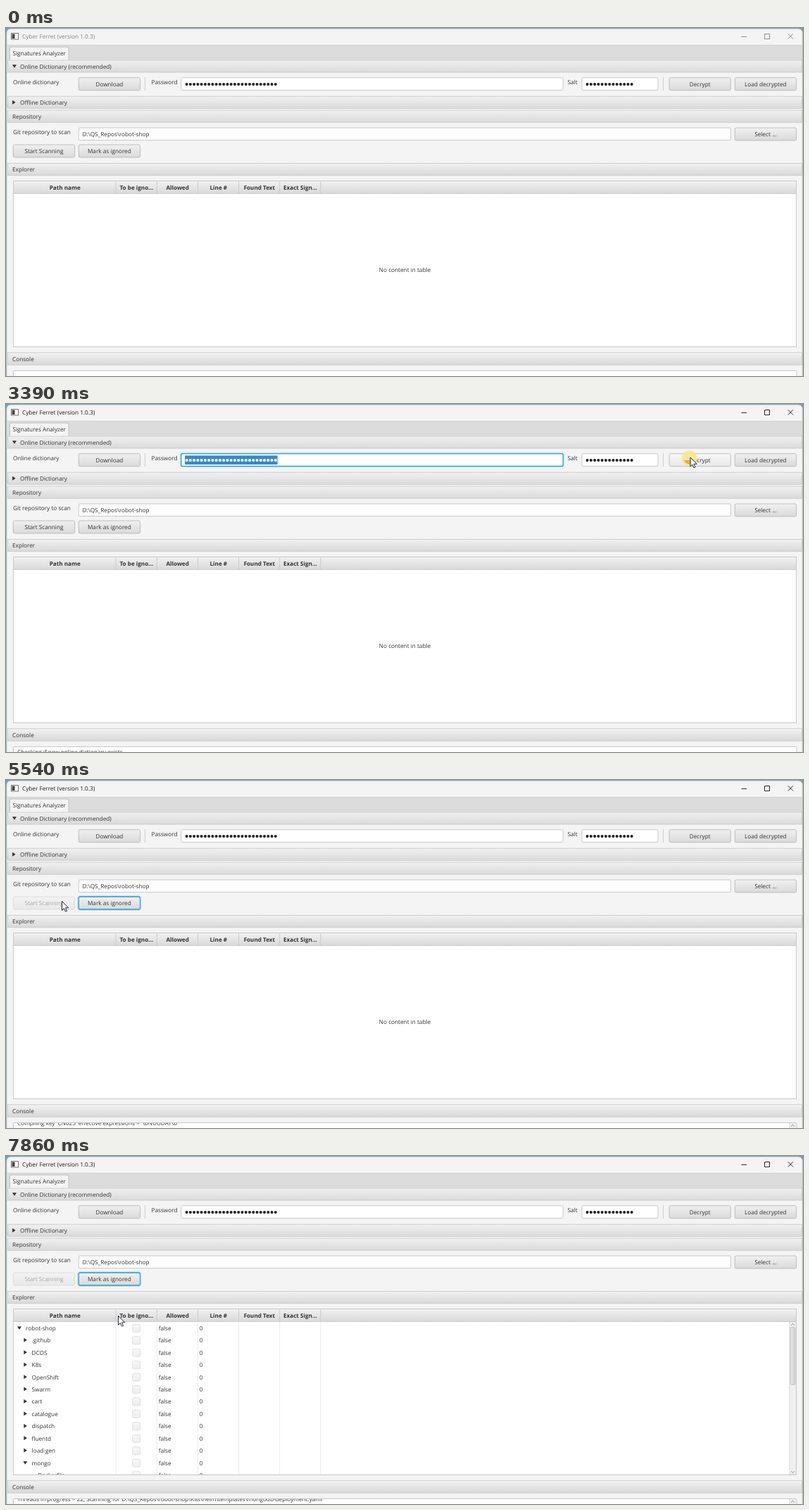
Write an HTML page that moves like this. It is 1132 by 495 pixels and loops after 8 s.

```html
<!DOCTYPE html>
<html lang="en">
<head>
<meta charset="utf-8">
<title>Signatures Analyzer</title>
<style>
  html, body { margin: 0; width: 100%; height: 100%; overflow: hidden; background: #7c9db2; }
  svg { display: block; }
  text { font: 8.23px "Open Sans", "Noto Sans", sans-serif; fill: #333; white-space: pre; text-rendering: geometricPrecision; }
  .bold { font-weight: 700; font-size: 8.15px; }
  .mid { text-anchor: middle; }
  .ring { fill: none; stroke: #35a3d6; stroke-width: 1.3; }
  .glow { fill: none; stroke: #039ed3; stroke-opacity: .16; stroke-width: 2.6; }
</style>
</head>
<body>
<svg id="stage" width="1132" height="495" viewBox="0 0 1132 495">
  <defs>
    <linearGradient id="head" x2="0" y2="1"><stop stop-color="#f1f1f1"/><stop offset="1" stop-color="#d9d9d9"/></linearGradient>
    <linearGradient id="face" x2="0" y2="1"><stop stop-color="#f0f0f0"/><stop offset="1" stop-color="#dadada"/></linearGradient>
    <linearGradient id="lit" x2="0" y2="1"><stop stop-color="#f8f8f8"/><stop offset="1" stop-color="#e8e8e8"/></linearGradient>
    <linearGradient id="thumb" x2="1" y2="0"><stop stop-color="#e9e9e9"/><stop offset="1" stop-color="#d2d2d2"/></linearGradient>
    <clipPath id="tableClip"><rect x="11" y="236" width="1111" height="217"/></clipPath>
    <clipPath id="consoleClip"><rect x="11" y="488" width="1111" height="7"/></clipPath>
  </defs>
</svg>
<script>
const LOOP = 8000;
const stage = document.getElementById('stage');

function add(parent, tag, attrs, content) {
  const el = document.createElementNS('http://www.w3.org/2000/svg', tag);
  for (const key in attrs) el.setAttribute(key, attrs[key]);
  if (content !== undefined) el.textContent = content;
  parent.appendChild(el);
  return el;
}
const group = (parent = stage, attrs = {}) => add(parent, 'g', attrs);
const rect = (p, x, y, width, height, fill, more = {}) =>
  add(p, 'rect', { x, y, width, height, fill, ...more });
const path = (p, d, more = {}) => add(p, 'path', { d, ...more });
const line = (p, d, stroke, width = 1) => path(p, d, { stroke, fill: 'none', 'stroke-width': width });
const label = (p, x, y, text, cls = '') => add(p, 'text', { x, y, class: cls }, text);
const show = (el, on) => el.setAttribute('visibility', on ? 'visible' : 'hidden');

function header(y, h, text, x = 9) {
  rect(stage, 2.5, y, 1128, h, 'url(#head)', { stroke: '#c6c6c6', 'stroke-width': .8 });
  return label(stage, x, y + h / 2 + 3, text);
}
function arrow(p, x, y, open) {
  path(p, open ? `M${x - 3} ${y - 2}h6l-3 4.6z` : `M${x - 2} ${y - 3}v6l4.6-3z`, { fill: '#333' });
}
function field(x, y, w, h) {
  rect(stage, x, y, w, h, '#fff', { stroke: '#c3c3c3', rx: 2, 'stroke-width': .9 });
}
function focusRing(x, y, w, h) {
  const g = group();
  rect(g, x - .8, y - .8, w + 1.6, h + 1.6, 'none', { rx: 3, class: 'glow' });
  rect(g, x, y, w, h, 'none', { rx: 2, class: 'ring' });
  return g;
}
function button(x, y, text) {
  const w = 87.3, h = 18, g = group();
  const box = rect(g, x, y, w, h, 'url(#face)', { stroke: '#b9b9b9', rx: 2, 'stroke-width': .9 });
  label(g, x + w / 2, y + h / 2 + 3.1, text, 'mid');
  const ring = focusRing(x, y, w, h);
  return {
    update(cx, cy, focused, disabled = false) {
      const over = !disabled && cx >= x && cx <= x + w && cy >= y && cy <= y + h;
      box.setAttribute('fill', over ? 'url(#lit)' : 'url(#face)');
      g.setAttribute('opacity', disabled ? .4 : 1);
      show(ring, focused);
    }
  };
}
function dots(p, x, y, count, fill) {
  for (let i = 0; i < count; i++) add(p, 'circle', { cx: x + i * 5.26, cy: y, r: 2.05, fill });
}

// window frame
rect(stage, .8, 1, 1130.6, 510, '#f4f4f4', { rx: 6, stroke: '#a9b4bb', 'stroke-width': .8 });
rect(stage, 7.5, 7.5, 10, 8.5, '#fff', { stroke: '#777', 'stroke-width': 1 });
rect(stage, 8.5, 8.5, 4, 6.5, '#444');
const title = label(stage, 23, 15.2, 'Cyber Ferret (version 1.0.3)');
const controls = line(stage, 'M1044.5 12.5h7.5M1077.5 8.5h7v7h-7zM1110.7 8.2l7.2 7.2m0-7.2l-7.2 7.2', '#111', .9);

// tab strip
rect(stage, 1.5, 24, 1129.5, 21.5, '#dcdcdc');
line(stage, 'M1.5 24.3H1131', '#cfcfcf', .7);
path(stage, 'M5.5 46V29q0-2 2-2H87q2 0 2 2V46', { fill: '#f4f4f4', stroke: '#bdbdbd', 'stroke-width': .9 });
label(stage, 9.5, 39.2, 'Signatures Analyzer');

// panes
const paneTitle = header(46, 17, 'Online Dictionary (recommended)', 20);
arrow(stage, 12, 54.2, true);
header(97.2, 17, 'Offline Dictionary', 20);
arrow(stage, 11, 105.7, false);
header(117, 17.2, 'Repository');
header(192.5, 17.2, 'Explorer');
header(461.8, 17.4, 'Console');

label(stage, 10, 80.2, 'Online dictionary');
label(stage, 206.5, 80.2, 'Password');
label(stage, 797.5, 80.2, 'Salt');
line(stage, 'M197.5 70V89M933.5 70V89', '#d0d0d0');
field(248.7, 70.7, 542.6, 17.8);
field(818, 70.7, 108, 17.8);
const plain = group(), picked = group();
dots(plain, 256.6, 80, 25, '#222');
rect(picked, 254, 73.3, 131.6, 12.8, '#3a89c6');
dots(picked, 256.6, 80, 25, '#fff');
dots(stage, 825.6, 80, 13, '#222');
const passRing = focusRing(248.7, 70.7, 542.6, 17.8);

label(stage, 10, 151.3, 'Git repository to scan');
field(103.3, 142, 926, 17.6);
label(stage, 108.5, 154.2, 'D:\\QS_Repos\\robot-shop');

const download = button(103.2, 70.7, 'Download');
const decrypt = button(942, 70.7, 'Decrypt');
const load = button(1035.2, 70.7, 'Load decrypted');
const select = button(1035.2, 142, 'Select ...');
const start = button(10.3, 166, 'Start Scanning');
const mark = button(103.2, 166, 'Mark as ignored');

// table
rect(stage, 10.5, 217.5, 1112, 236, '#fff', { stroke: '#c4c4c4', 'stroke-width': .9 });
rect(stage, 11, 218, 1111, 17.5, 'url(#head)');
line(stage, 'M11 235.6H1122', '#c4c4c4', .8);
const edges = [156, 214.3, 272.6, 330.6, 388.7, 446.8];
const names = ['Path name', 'To be igno...', 'Allowed', 'Line #', 'Found Text', 'Exact Sign...'];
names.forEach((name, i) => {
  label(stage, ((edges[i - 1] || 11) + edges[i]) / 2 + .2, 230.3, name, 'bold mid');
  line(stage, `M${edges[i]} 218V235.5`, '#c6c6c6', .8);
});
const empty = label(stage, 566.5, 347.4, 'No content in table', 'mid');

const rows = group(stage, { 'clip-path': 'url(#tableClip)' });
edges.forEach(x => line(rows, `M${x} 236V453`, '#e6e6e6', .8));
const files = ['robot-shop', '.github', 'DCOS', 'K8s', 'OpenShift', 'Swarm', 'cart', 'catalogue',
  'dispatch', 'fluentd', 'load-gen', 'mongo', 'Dockerfile'];
files.forEach((name, i) => {
  const y = 244.8 + i * 17.44, depth = i === 0 ? 0 : i === 12 ? 2 : 1;
  if (depth < 2) arrow(rows, 19 + depth * 8.3, y - .4, i === 0 || i === 11);
  label(rows, 28 + depth * 8.6, y + 3, name);
  rect(rows, 179.7, y - 5.4, 11, 11, 'url(#face)', { stroke: '#b9b9b9', rx: 2, opacity: .45 });
  label(rows, 216.7, y + 3, 'false');
  label(rows, 274.8, y + 3, '0');
});
rect(rows, 1112.8, 236, 9.4, 217, '#f0f0f0', { stroke: '#d2d2d2', 'stroke-width': .7 });
rect(rows, 1114, 243.7, 6.8, 81.5, 'url(#thumb)', { stroke: '#b4b4b4', rx: 1.5, 'stroke-width': .8 });
line(rows, 'M1115.2 240.8l2.3-2.2 2.3 2.2M1115.2 448.4l2.3 2.2 2.3-2.2', '#777', .9);

// console
rect(stage, 10.5, 487.5, 1112.5, 20, '#fff', { stroke: '#c4c4c4', rx: 1, 'stroke-width': .9 });
const consoleArea = group(stage, { 'clip-path': 'url(#consoleClip)' });
const output = label(consoleArea, 16, 498.2, '');
const consoleBar = group(consoleArea);
rect(consoleBar, 1112.8, 487.5, 9.4, 12, '#f0f0f0', { stroke: '#d2d2d2', 'stroke-width': .7 });
line(consoleBar, 'M1115.2 492.6l2.3-2.2 2.3 2.2', '#777', .9);

// click spot and pointer
const spot = group();
add(spot, 'circle', { cx: -1, cy: 1.5, r: 10.8, fill: '#fae68c', opacity: .88 });
path(spot, 'M-9 4.5H3V10.5Q-5 11-9 4.5z', { fill: '#f5a83c' });
const pointer = path(stage, 'M.5 .5V13.3L3.4 10.6 5.4 15.2 7.5 14.3 5.5 9.8H9.6z',
  { fill: '#fff', stroke: '#1c1c2a', 'stroke-width': .95, 'stroke-linejoin': 'round' });

// pointer track: time, x, y
const track = [
  [390, 641, 474], [600, 370, 335], [820, 88, 178], [980, 118, 98], [1080, 151, 68], [1140, 157, 75],
  [1220, 157, 75], [1260, 155, 75], [1740, 155, 75], [1750, 154, 75], [1765, 154, 75], [1780, 154, 76],
  [2760, 154, 76], [3000, 420, 77], [3220, 850, 76], [3370, 971.5, 75.5], [3600, 971.5, 75.5],
  [3820, 1050, 78], [3960, 1099, 79], [4140, 1066, 79], [4470, 1066, 79], [4580, 1065, 81],
  [4640, 1065, 81], [4900, 600, 122], [5110, 200, 160], [5270, 79, 172], [5795, 79, 172], [5800, 79, 173],
  [6180, 79, 173], [6590, 125, 232], [6730, 125, 232], [6900, 186, 262], [7070, 252, 284],
  [7210, 207, 285], [7400, 181, 252], [7530, 167, 231], [7580, 167, 231], [7860, 159, 227], [LOOP, 159, 227]
];
const still = i => !track[i + 1] || (track[i][1] === track[i + 1][1] && track[i][2] === track[i + 1][2]);
function slope(i, k) {
  if (i === 0 || still(i) || still(i - 1)) return 0;
  return (track[i + 1][k] - track[i - 1][k]) / (track[i + 1][0] - track[i - 1][0]);
}
function position(t) {
  let i = 0;
  while (i < track.length - 2 && t >= track[i + 1][0]) i++;
  const a = track[i], b = track[i + 1], span = b[0] - a[0];
  const u = Math.min(1, Math.max(0, (t - a[0]) / span)), v = 1 - u;
  return [1, 2].map(k => a[k] * (1 + 2 * u) * v * v + b[k] * (3 - 2 * u) * u * u
    + span * (slope(i, k) * u * v * v - slope(i + 1, k) * u * u * v));
}

const clicks = [[1950, 2080], [3380, 3470], [4470, 4570], [5320, 5410]];
const within = (t, from, to = LOOP) => t >= from && t < to;
const scans = [
  [5800, 'cart\\Dockerfile'], [6180, 'catalogue\\server.js'], [6270, 'K8s\\helm\\Chart.yaml'],
  [6360, 'dispatch\\main.go'], [6450, 'K8s\\helm\\templates\\cart-service.yaml'],
  [6540, 'K8s\\helm\\templates\\mongodb-deployment.yaml']
];

function consoleText(t) {
  if (t < 2120) return '';
  if (t < 4680) return 'Checking if new online dictionary exists';
  if (t < 5800) {
    const key = Math.min(25, 1 + Math.floor((t - 4680) / 32));
    return `Compiling key 'CN${String(key).padStart(3, '0')}' effective expressions = '\\bNUUDAY\\b'`;
  }
  const file = scans.filter(s => t >= s[0]).pop()[1];
  return `Threads in progress = 22, Scanning for D:\\QS_Repos\\robot-shop\\${file}`;
}

function draw(t) {
  const [x, y] = position(t), seen = t >= 390;
  const cx = seen ? x : -50, active = t >= 1950, passFocus = within(t, 2760, 3470), filled = t >= 5800;
  title.style.fill = active ? '#1b1b1b' : '#858585';
  controls.setAttribute('stroke', active ? '#111' : '#808080');
  paneTitle.style.fill = within(t, 1950, 2760) ? '#0096c9' : '#333';

  show(plain, !passFocus);
  show(picked, passFocus);
  show(passRing, passFocus);
  download.update(cx, y, false);
  decrypt.update(cx, y, false);
  load.update(cx, y, within(t, 3470, 5360));
  select.update(cx, y, false);
  start.update(cx, y, within(t, 5360, 5420), t >= 5420);
  mark.update(cx, y, t >= 5420);

  show(empty, !filled);
  show(rows, filled);
  const text = consoleText(t);
  if (output.textContent !== text) output.textContent = text;
  output.setAttribute('y', t < 4680 ? 498.2 : 491.4);
  show(consoleBar, t >= 4680);

  const place = `translate(${x.toFixed(2)} ${y.toFixed(2)})`;
  spot.setAttribute('transform', place);
  pointer.setAttribute('transform', place);
  show(spot, clicks.some(c => within(t, c[0], c[1])));
  show(pointer, seen);
}

const began = performance.now();
function tick() {
  draw((performance.now() - began) % LOOP);
  requestAnimationFrame(tick);
}
tick();
</script>
</body>
</html>
```
